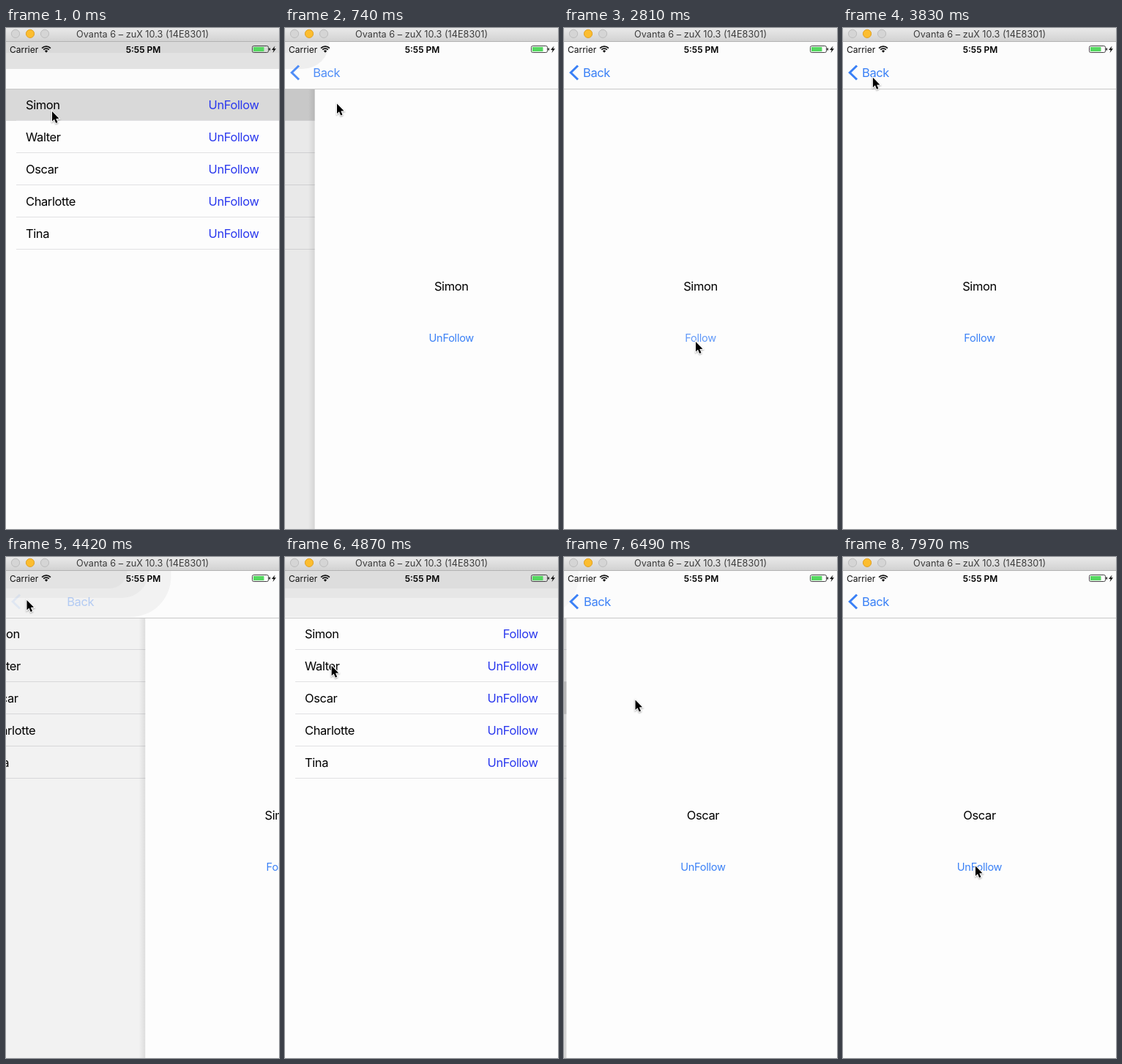
Animation of 373x685 px, one loop 8 s. Source, as an HTML page with a canvas:

```html
<!DOCTYPE html>
<html lang="en">
<head>
<meta charset="utf-8">
<title>Follow list</title>
<style>
html, body { margin: 0; width: 100%; height: 100%; overflow: hidden; background: #fdfdfd; }
canvas { display: block; width: 373px; height: 685px; }
</style>
</head>
<body>
<canvas id="stage" width="373" height="685"></canvas>
<script>
const W = 373, H = 685, LOOP = 8000, TICK = 147.8, LAST = 54;
const BAR_TOP = 19, BAR_END = 83, ROW = 44;
const PAPER = '#fdfdfd', LINK = '#3a80f6', ACTION = '#2a38ee';
const NAMES = ['Simon', 'Walter', 'Oscar', 'Charlotte', 'Tina'];
const ctx = document.getElementById('stage').getContext('2d');

const clamp = v => Math.max(0, Math.min(1, v));
const easeOut = (t, power) => 1 - (1 - t) ** power;

// Pointer moves, in ticks
const HOME = { x: 63, y: 114 };
const MOVES = [
  { from: 0, to: 2, x: 71, y: 103.5 },
  { from: 6, to: 14, x: 180, y: 429 },
  { from: 21, to: 28, x: 28.5, y: 59 },
  { from: 30, to: 40, x: 97.5, y: 195.5 },
  { from: 48, to: LAST, x: 181, y: 422.5 }
];

// The vertical part settles sooner, which bends the path
function pointer(n) {
  return MOVES.reduce((p, m) => {
    const t = clamp((n - m.from) / (m.to - m.from));
    return {
      x: p.x + (m.x - p.x) * easeOut(t, 2),
      y: p.y + (m.y - p.y) * easeOut(t, 3)
    };
  }, HOME);
}

// Critically damped slide, counted in ticks
function spring(ticks) {
  if (ticks <= 0) return 0;
  const x = 2.952 * ticks;
  const p = 1 - (1 + x) * Math.exp(-x);
  return p > 0.993 ? 1 : p;
}

function stateAt(n) {
  const first = n < 30, second = n >= 42;
  const popping = !first && !second;
  const tapped = n >= 18;
  return {
    first, popping,
    cover: popping ? 1 - spring(n - 29.42) : spring(n - (second ? 41.72 : 3.72)),
    picked: popping ? -1 : second ? 2 : 0,
    person: NAMES[second ? 2 : 0],
    rowLabel: tapped ? 'Follow' : 'UnFollow',
    label: tapped && !second ? 'Follow' : 'UnFollow',
    labelAlpha: n < 17 ? 1 : clamp(0.3 + (n - 17) * 0.25),
    backAlpha: n === 29 ? 0.3 : 1
  };
}

function rect(x, y, w, h, color) {
  ctx.fillStyle = color;
  ctx.fillRect(x, y, w, h);
}

function text(str, x, y, size, color, { align = 'left', weight = 400, track = 0 } = {}) {
  ctx.font = `${weight} ${size}px Inter, "Open Sans", sans-serif`;
  ctx.letterSpacing = track + 'px';
  ctx.textAlign = align;
  ctx.fillStyle = color;
  ctx.fillText(str, x, y);
}

const body = (str, x, y, color, align) =>
  text(str, x, y, 16.5, color, { align, track: -0.4 });

function poly(points, close) {
  ctx.beginPath();
  points.forEach(([x, y]) => ctx.lineTo(x, y));
  if (close) ctx.closePath();
}

function faded(alpha, draw) {
  ctx.save();
  ctx.globalAlpha *= alpha;
  draw();
  ctx.restore();
}

function drawList(s) {
  ctx.save();
  ctx.translate(-112 * s.cover, 0);
  rect(0, BAR_END, W + 112, H, PAPER);
  NAMES.forEach((name, i) => {
    const y = BAR_END + i * ROW;
    if (i === s.picked) rect(0, y, W, ROW, '#d9d9d9');
    rect(14, y + 43, W, 1, '#e1e1e3');
    body(name, 27, y + 27.5, '#000');
    body(i ? 'UnFollow' : s.rowLabel, 345.5, y + 27.5, ACTION, 'right');
  });
  ctx.restore();
  rect(0, BAR_END, W, H, `rgba(0,0,0,${0.09 * s.cover})`);
}

function drawDetail(s) {
  const x = W * (1 - s.cover);
  if (s.cover < 1) {
    const g = ctx.createLinearGradient(x - 9, 0, x, 0);
    g.addColorStop(0, 'rgba(0,0,0,0)');
    g.addColorStop(1, 'rgba(0,0,0,.09)');
    rect(x - 9, BAR_END, 9, H, g);
  }
  ctx.save();
  ctx.translate(x, 0);
  rect(0, BAR_END, W, H, PAPER);
  body(s.person, 186.5, 358.5, '#000', 'center');
  faded(s.labelAlpha, () =>
    text(s.label, 186.5, 428.5, 14.6, LINK, { align: 'center', track: -0.28 }));
  ctx.restore();
}

// Grey glow of the list behind the bar, stacked in steps
function drawGlow(s) {
  const q = s.cover;
  const edge = q === 0 ? 2 * W : W * (1 - q) * 1.1 + 16;
  const bands = s.first ? [[56, 0.1], [34, 0.04]] : [[82, 0.05], [56, 0.04], [43, 0.04]];
  bands.forEach(([end, shade], i) => {
    const h = end - BAR_TOP;
    ctx.beginPath();
    ctx.roundRect(-100, BAR_TOP, edge + 100 - 30 * i, h, [0, 0, Math.min(55, h), 0]);
    ctx.fillStyle = `rgba(0,0,0,${shade * (1 - q / 2)})`;
    ctx.fill();
  });
}

function drawBar(s) {
  const q = s.cover;
  rect(0, BAR_TOP, W, BAR_END - BAR_TOP, '#fcfcfc');
  if (q < 1) drawGlow(s);
  rect(0, BAR_END, W, 1, '#c8c8c8');
  if (q === 0) return;

  faded(s.backAlpha * (s.popping ? q * 0.2 : q), () => {
    poly([[19, 51.5], [9.2, 61], [19, 70.5]]);
    ctx.lineWidth = 3;
    ctx.strokeStyle = LINK;
    ctx.stroke();
  });
  faded(s.backAlpha * (s.popping ? q * 0.7 : q), () =>
    body('Back', 26 + 112 * (1 - q), 67, LINK));
}

function drawStatus() {
  text('Carrier', 5, 33.5, 12, '#111');
  text('5:55 PM', 187.5, 33.5, 12, '#000', { align: 'center', weight: 600 });

  ctx.strokeStyle = ctx.fillStyle = '#111';
  ctx.lineWidth = 1.7;
  for (const r of [5.4, 8.4]) {
    ctx.beginPath();
    ctx.arc(55, 33.5, r, -Math.PI * 0.75, -Math.PI * 0.25);
    ctx.stroke();
  }
  ctx.beginPath();
  ctx.moveTo(55, 33.8);
  ctx.arc(55, 33.5, 3, -Math.PI * 0.75, -Math.PI * 0.25);
  ctx.fill();

  ctx.lineWidth = 1;
  ctx.strokeStyle = '#444';
  ctx.beginPath();
  ctx.roundRect(336.5, 24.5, 22, 9, 2);
  ctx.stroke();
  rect(338, 26, 14.5, 6, '#55d860');
  rect(359.5, 27.5, 1.5, 3, '#111');
  poly([[367.5, 24.5], [363, 30], [365.7, 30], [364.5, 34], [369, 28.3], [366.3, 28.3]], true);
  ctx.fill();
}

function drawWindow() {
  const g = ctx.createLinearGradient(0, 0, 0, 18);
  g.addColorStop(0, '#e9e9e9');
  g.addColorStop(1, '#d2d2d2');
  rect(0, 0, W, 18, g);
  rect(0, 18, W, 1, '#b3b3b3');
  ctx.lineWidth = 1;
  for (let i = 0; i < 3; i++) {
    ctx.beginPath();
    ctx.arc(13 + i * 20, 7.8, 5.6, 0, Math.PI * 2);
    ctx.fillStyle = i === 1 ? '#fcbd2f' : '#d5d5d5';
    ctx.strokeStyle = i === 1 ? '#dfa023' : '#bcbcbc';
    ctx.fill();
    ctx.stroke();
  }
  text('Ovanta 6 – zuX 10.3 (14E8301)', 186.5, 12.8, 12.7, '#3c3c3c', { align: 'center' });
}

function drawPointer({ x, y }) {
  ctx.save();
  ctx.translate(x, y);
  poly([[0, 0], [0, 13.5], [3, 10.7], [5.2, 16], [7.5, 15], [5.3, 10], [9.5, 9.8]], true);
  ctx.shadowColor = 'rgba(0,0,0,.35)';
  ctx.shadowBlur = 2;
  ctx.shadowOffsetY = 1;
  ctx.lineWidth = 2;
  ctx.strokeStyle = '#fff';
  ctx.stroke();
  ctx.shadowColor = 'transparent';
  ctx.fillStyle = '#000';
  ctx.fill();
  ctx.restore();
}

function render(ms) {
  const n = Math.min(LAST, Math.floor((ms + 20) / TICK));
  const s = stateAt(n);
  rect(0, 0, W, H, PAPER);
  if (s.cover < 1) drawList(s);
  if (s.cover > 0) drawDetail(s);
  drawBar(s);
  drawStatus();
  drawWindow();
  drawPointer(pointer(n));
}

const start = performance.now();
function loop() {
  render((performance.now() - start) % LOOP);
  requestAnimationFrame(loop);
}
loop();
</script>
</body>
</html>
```
